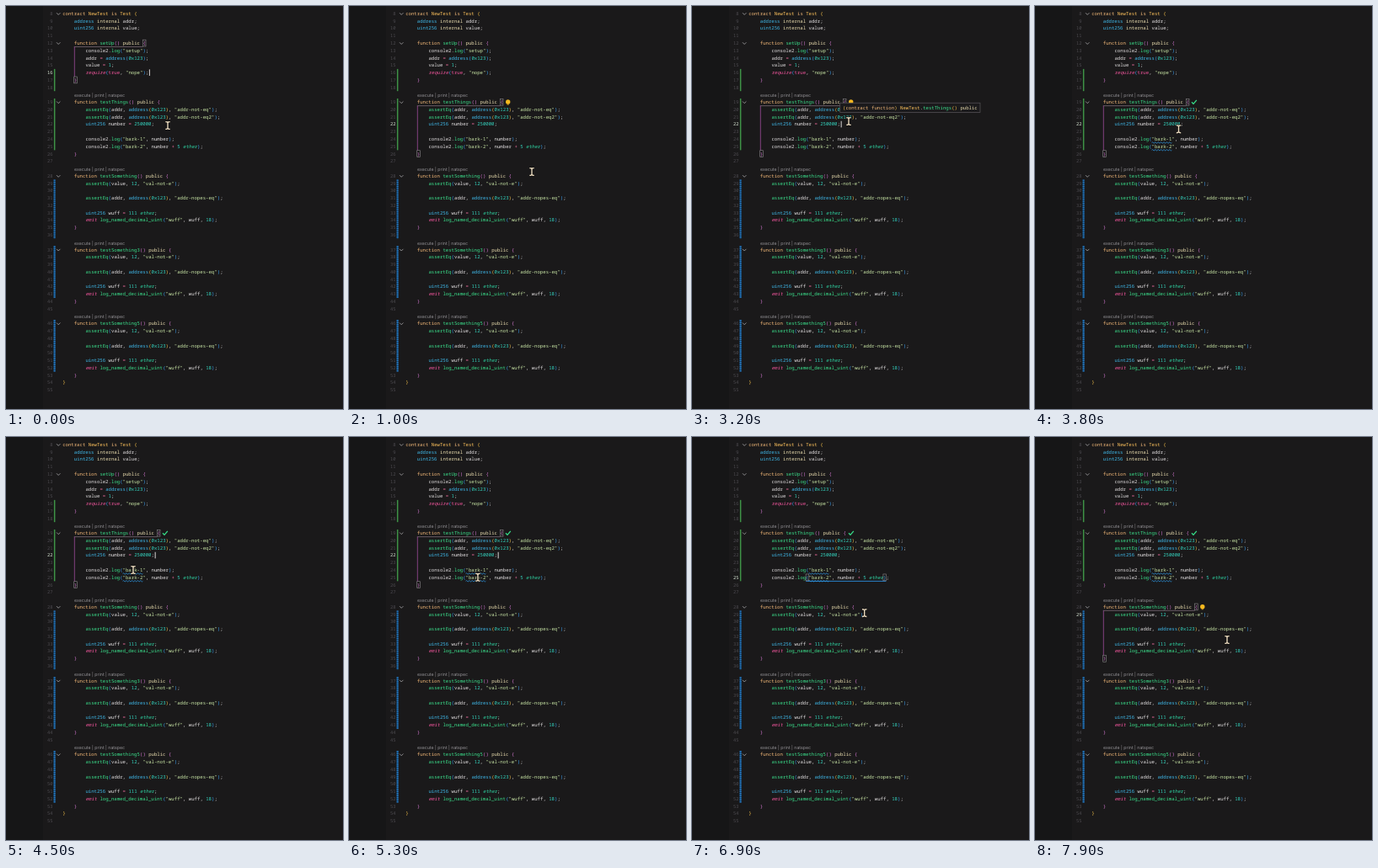
An HTML page that plays this animation: 400 px wide and 479 px high, repeating every 8 s.

```html
<!DOCTYPE html>
<html lang="en">
<head>
<meta charset="utf-8">
<title>Editor session</title>
<style>
html, body { margin: 0; width: 100%; height: 100%; overflow: hidden; background: #1a191a; }
svg { display: block; width: 400px; height: 479px; }
text { white-space: pre; text-rendering: geometricPrecision; }
.code { font: 500 5.65px "Noto Sans Mono", "DejaVu Sans Mono", monospace; }
.num { font-size: 5.4px; font-weight: 400; text-anchor: end; }
.lens { font: 5.25px Inter, "Liberation Sans", sans-serif; fill: #969498; }
</style>
</head>
<body>
<svg id="stage" viewBox="0 0 400 479"></svg>
<script>
const LOOP = 8000, STEP = 100;
const X0 = 67.2, CW = 3.4, Y0 = 9, LH = 8.77;
const stage = document.getElementById('stage');
const col = c => X0 + c * CW;
const row = r => Y0 + r * LH;

function add(parent, tag, attrs, text) {
  const el = document.createElementNS('http://www.w3.org/2000/svg', tag);
  for (const k in attrs) el.setAttribute(k, attrs[k]);
  if (text !== undefined) el.textContent = text;
  parent.append(el);
  return el;
}
const group = parent => add(parent, 'g', {});
const rect = (p, x, y, width, height, fill, more) =>
  add(p, 'rect', { x, y, width, height, fill, ...more });
const path = (p, d, stroke, width = 0.8) =>
  add(p, 'path', { d, stroke, fill: 'none', 'stroke-width': width });

// Source code
const wuffTest = name => [
  '@',
  `    function ${name}() public {`,
  '        assertEq(value, 12, "val-not-e");',
  '',
  '        assertEq(addr, address(0x123), "addr-nopes-eq");',
  '',
  '        uint256 wuff = 111 ether;',
  '        emit log_named_decimal_uint("wuff", wuff, 18);',
  '    }'
];
const lines = [
  'contract NewTest is Test {',
  '    address internal addr;',
  '    uint256 internal value;',
  '',
  '    function setUp() public {',
  '        console2.log("setup");',
  '        addr = address(0x123);',
  '        value = 1;',
  '        require(true, "nope");',
  '    }',
  '',
  '@',
  '    function testThings() public {',
  '        assertEq(addr, address(0x123), "addr-not-eq");',
  '        assertEq(addr, address(0x123), "addr-not-eq2");',
  '        uint256 number = 250000;',
  '',
  '        console2.log("bark-1", number);',
  '        console2.log("bark-2", number + 5 ether);',
  '    }',
  '',
  ...wuffTest('testSomething'), '',
  ...wuffTest('testSomething3'), '',
  ...wuffTest('testSomething5'),
  '}',
  ''
];

// Syntax colours
const palette = [
  [/^"/, '#c9e6a6'],
  [/^\d/, '#35d6c0'],
  [/^(contract|is|function)$/, '#f2b878'],
  [/^(NewTest|Test)$/, '#ffc35c'],
  [/^(public|internal)$/, '#e9dcae'],
  [/^(address|uint256)$/, '#3fb9ea'],
  [/^(require|emit|true)$/, '#f0559c'],
  [/^ether$/, '#2fd6a4'],
  [/^[=+]$/, '#ef6f9f']
];
const brackets = ['#f5c04a', '#d578d2', '#3aa2f5'];
const slanted = /^(require|emit|ether)$/;
let depth = 0;

function tokenColor(tok, next) {
  if (/[({]/.test(tok)) return brackets[depth++ % 3];
  if (/[)}]/.test(tok)) return brackets[--depth % 3];
  const hit = palette.find(([re]) => re.test(tok));
  if (hit) return hit[1];
  return next === '(' ? '#3be08c' : '#e2dfe0';
}

function codeLine(parent, src, x, y) {
  for (const m of src.matchAll(/"[^"]*"|\w+|[^\w\s]/g)) {
    const tok = m[0];
    const t = add(parent, 'text', {
      class: 'code', x: x + m.index * CW, y: y + 1.9,
      fill: tokenColor(tok, src[m.index + tok.length])
    }, tok);
    if (slanted.test(tok)) t.style.fontStyle = 'italic';
  }
}

rect(stage, 0, 0, 400, 479, '#1a191a');
rect(stage, 0, 0, 44, 479, '#161617');

// Change bars in the gutter
for (const [a, b] of [[8, 10], [12, 18]])
  rect(stage, 56.9, row(a) - 4.3, 1.5, (b - a + 1) * LH, '#3f9347');
for (const [a, b] of [[23, 30], [32, 38], [42, 48]]) {
  const top = row(a) - 4.3, end = top + (b - a + 1) * LH;
  path(stage, `M57.6 ${top}V${end}`, '#174a78', 2);
  path(stage, `M57.6 ${top}V${end}`, '#2679c0', 2).setAttribute('stroke-dasharray', '1.4 1.1');
}

const guides = group(stage);
const numbers = {};
let lineNo = 8;
lines.forEach((src, r) => {
  const y = row(r);
  if (src === '@') {
    add(stage, 'text', { class: 'lens', x: 81, y: y + 2.8 }, 'execute | print | natspec');
    return;
  }
  numbers[lineNo] = add(stage, 'text', { class: 'code num', x: 55.6, y: y + 1.9, fill: '#4d4b50' }, lineNo);
  lineNo++;
  codeLine(stage, src, X0, y);
  if (/^(contract|    function)/.test(src))
    path(stage, `M60 ${y - 0.8}l2.2 2.2l2.2 -2.2`, '#a9a7aa', 0.8);
});

// One view for each place the text cursor rests
const box = (g, c, r) => rect(g, col(c) - 0.1, row(r) - 3.9, CW + 0.3, 7.8, 'none',
  { stroke: '#8c888c', 'stroke-width': 0.6 });

function blockScope(open, top, bottom) {
  const g = group(guides), y = row(top) + 4.4;
  path(g, `M${col(4)} ${y}H${col(open)}`, '#85717f', 0.7);
  path(g, `M${col(4) + 0.5} ${y}V${row(bottom) - 3.9}`, '#a04d9c', 0.8);
  box(g, open, top);
  box(g, 4, bottom);
  return g;
}
function callScope(open, close, r) {
  const g = group(guides);
  path(g, `M${col(open)} ${row(r) + 4.5}H${col(close + 1)}`, '#2c8fe0', 0.9);
  box(g, open, r);
  box(g, close, r);
  return g;
}
const spots = [
  { at: 0, line: 16, c: 30.2, r: 8, scope: blockScope(28, 4, 9) },
  { at: 200, line: 22, c: 32.2, r: 15, scope: blockScope(33, 12, 19) },
  { at: 5400, line: 25, c: 25, r: 18, scope: callScope(20, 47, 18) },
  { at: 7000, line: 29, c: 41, r: 23, scope: blockScope(36, 22, 29) }
];

function bulb(x, y) {
  const g = group(stage);
  add(g, 'circle', { cx: x, cy: y - 0.2, r: 2.7, fill: '#f6b91f' });
  rect(g, x - 1.2, y + 2.3, 2.4, 1, '#d59a18');
  return g;
}
const bulbs = [bulb(188.7, row(12)), bulb(198.8, row(22))];

// Test result: tick plus wavy underlines
const passed = group(stage);
path(passed, `M186 ${row(12)}l2 2.1l3.8 -4.5`, '#36e08a', 1.3);
for (const r of [17, 18])
  path(passed, `M${col(21)} ${row(r) + 4.4}` + 'q.85 -1.3 1.7 0t1.7 0'.repeat(7), '#2f9be8', 0.8);

const caret = rect(stage, 0, 0, 0.9, 7.6, '#f1eeee');

const tip = group(stage);
rect(tip, 175.7, 115.2, 166.3, 11.2, '#1b1a1c', { stroke: '#59565b', 'stroke-width': 0.7 });
depth = 0;
codeLine(tip, '(contract function) NewTest.testThings() public', 179, 121);

const mouse = group(stage);
const beam = 'M-2.7 -4.4Q0 -4.4 0 -3V3Q0 4.4 -2.7 4.4M2.7 -4.4Q0 -4.4 0 -3M0 3Q0 4.4 2.7 4.4';
path(mouse, beam, '#0c0b0b', 2.6);
path(mouse, beam, '#ecdcc0', 1.4);

// time, x, y
const route = [
  [0, 192, 142], [200, 192, 142], [1000, 217, 197], [1900, 197, 128],
  [2500, 186, 116], [2900, 186, 118], [3200, 186, 137], [4500, 151, 158],
  [5400, 153, 167], [6200, 153, 167], [7000, 207, 211], [7200, 207, 211],
  [7900, 228, 241], [8000, 228, 241]
];
function mouseAt(t) {
  const i = Math.max(1, route.findIndex(p => p[0] > t));
  const [ta, xa, ya] = route[i - 1], [tb, xb, yb] = route[i];
  const u = (t - ta) / (tb - ta), e = u * u * (3 - 2 * u);
  return [xa + (xb - xa) * e, ya + (yb - ya) * e];
}

const show = (el, on) => el.setAttribute('visibility', on ? 'visible' : 'hidden');

function draw(t) {
  const now = spots.filter(s => s.at <= t).pop();
  for (const s of spots) {
    show(s.scope, s === now);
    numbers[s.line].setAttribute('fill', s === now ? '#d9e8d6' : '#4d4b50');
  }
  caret.setAttribute('x', col(now.c));
  caret.setAttribute('y', row(now.r) - 3.8);
  show(caret, (t - now.at) % 1000 < 500);
  show(bulbs[0], t >= 500 && t < 3800);
  show(bulbs[1], t >= 7200);
  show(tip, t >= 2600 && t < 3800);
  show(passed, t >= 3800);
  mouse.setAttribute('transform', `translate(${mouseAt(t)})`);
}

const start = performance.now();
function tick() {
  const t = Math.max(0, performance.now() - start) % LOOP;
  draw(Math.floor(t / STEP) * STEP);
  requestAnimationFrame(tick);
}
tick();
</script>
</body>
</html>
```
